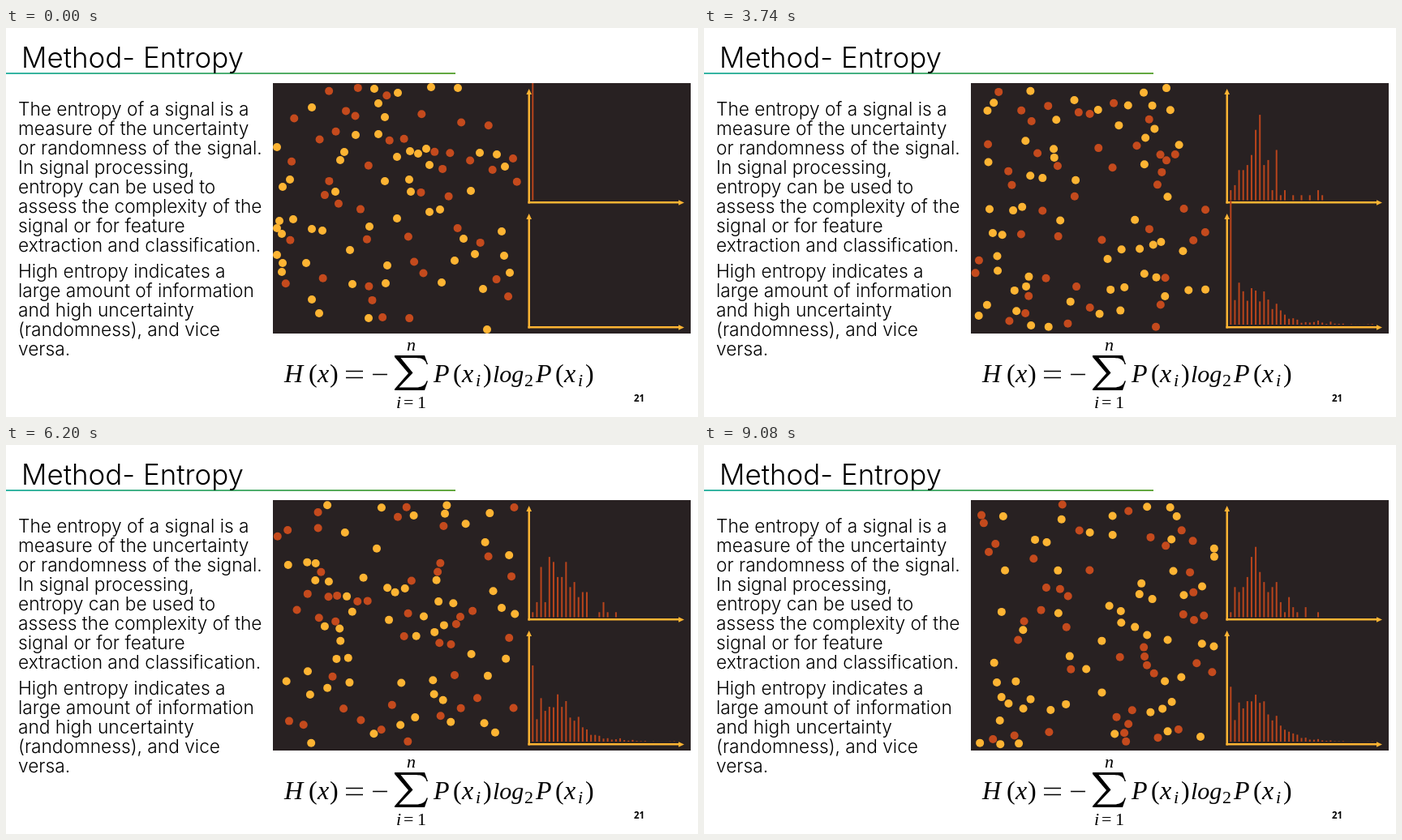
Recreate the animation shown at these times as an HTML page with a canvas. Size 853 px wide and 480 px high, loop 9.14 s.

```html
<!DOCTYPE html>
<html lang="en">
<head>
<meta charset="utf-8">
<title>Method- Entropy</title>
<style>
  html, body { margin: 0; width: 100%; height: 100%; overflow: hidden; background: #fff; }
  svg, canvas { position: absolute; left: 0; top: 0; }
  .slide { font-family: Inter, sans-serif; font-weight: 300; }
  .math { font: italic 32px "Liberation Serif", serif; }
  .up { font-style: normal; }
  .small { font-size: 22px; }
</style>
</head>
<body>
<canvas id="stage" width="853" height="480"></canvas>
<svg width="853" height="480">
  <linearGradient id="rule"><stop stop-color="#35b5a5"/><stop offset="1" stop-color="#64a83f"/></linearGradient>
  <rect y="55" width="554" height="2" fill="url(#rule)"/>
  <text class="slide" x="19" y="49" font-size="34.9">Method- Entropy</text>
  <g class="slide" id="body" font-size="22.7"></g>
  <g class="math">
    <text x="343" y="437">H<tspan class="up" x="373">(</tspan><tspan x="384">x</tspan><tspan class="up" x="399">)</tspan></text>
    <path d="M419 423.5h21m-21 8h21M452 427.5h18" stroke="#000" stroke-width="1.5"/>
    <path d="M479 404h37l4 11h-1.500q-2-8-13-8h-19l15 18.500-17 18h20q12 0 14-8h1.500l-4 11.500h-37v-1.500l17-19.500-17-20z"/>
    <text class="small" x="494" y="398">n</text>
    <text class="small" x="481" y="469">i<tspan class="up" x="490">=</tspan><tspan class="up" x="507">1</tspan></text>
    <text x="527" y="437">P<tspan class="up" x="551">(</tspan><tspan x="562">x</tspan><tspan class="up" x="588">)</tspan><tspan x="600" font-size="30">log</tspan><tspan x="653">P</tspan><tspan class="up" x="677">(</tspan><tspan x="688">x</tspan><tspan class="up" x="714">)</tspan></text>
    <text class="small" x="579" y="442">i<tspan class="up" x="639">2</tspan><tspan x="705">i</tspan></text>
  </g>
  <text x="774" y="461" font-family="Noto Sans, sans-serif" font-weight="700" font-size="11.500">21</text>
</svg>
<script>
const paragraphs = [
  [108, ["The entropy of a signal is a", "measure of the uncertainty", "or randomness of the signal.",
    "In signal processing,", "entropy can be used to", "assess the complexity of the",
    "signal or for feature", "extraction and classification."]],
  [308, ["High entropy indicates a", "large amount of information", "and high uncertainty",
    "(randomness), and vice", "versa."]]
];
document.getElementById("body").innerHTML = paragraphs.map(([top, lines]) =>
  lines.map((line, i) => `<text x="15" y="${top + i * 24}">${line}</text>`).join("")).join("");

const ORANGE = "#fdb433", RED = "#c44a1d", DARK = "#282122";
const PANEL = { x: 329, y: 68, w: 515, h: 309 };
const BOX = { left: 334, right: 631, top: 73, bottom: 372 };
const RADIUS = 5, COUNT = 100, FRAMES = 150, SUBSTEPS = 30;
const RMS_SPEED = 6.5, BIN_SPEED = 0.74, BINS = 36, UNIT = 6.2;
const FIRST_HOLD = 200, STEP = 60, LOOP = 9140;

const orangeStart = [
  454,75, 483,80, 524,73, 557,74, 377,98, 459,93, 467,110, 459,131, 431,132, 417,153,
  412,163, 334,147, 482,159, 498,152, 508,155, 518,149, 522,169, 584,154, 605,156, 615,171,
  467,189, 497,187, 499,202, 350,187, 341,196, 406,202, 573,201, 535,224, 522,227, 482,235,
  448,245, 337,238, 354,236, 334,247, 340,254, 377,248, 390,250, 334,280, 341,290, 340,301,
  370,290, 424,274, 427,316, 470,293, 468,315, 377,335, 386,352, 447,358, 564,260, 578,279,
  553,287, 537,314, 588,322, 611,251, 614,281, 621,302, 593,372
];

let seed = 21;
function random() {
  seed = (seed * 1664525 + 1013904223) % 4294967296;
  return seed / 4294967296;
}

function createBalls() {
  const balls = [];
  const add = (x, y, color, vx = 0, vy = 0) => balls.push({ x, y, vx, vy, color });
  for (let i = 0; i < orangeStart.length; i += 2) add(orangeStart[i], orangeStart[i + 1], ORANGE);
  // A single fast ball carries all the energy.
  add(625, 161, RED, -RMS_SPEED * Math.sqrt(COUNT) * 0.97, RMS_SPEED * Math.sqrt(COUNT) * 0.24);
  while (balls.length < COUNT) {
    const x = BOX.left + random() * (BOX.right - BOX.left);
    const y = BOX.top + random() * (BOX.bottom - BOX.top);
    if (balls.every(b => Math.hypot(b.x - x, b.y - y) > 11)) add(x, y, RED);
  }
  return balls;
}

function collide(a, b) {
  const dx = b.x - a.x, dy = b.y - a.y, d2 = dx * dx + dy * dy;
  if (d2 > 4 * RADIUS * RADIUS || d2 === 0) return;
  const push = ((b.vx - a.vx) * dx + (b.vy - a.vy) * dy) / d2;
  if (push >= 0) return;
  a.vx += push * dx; a.vy += push * dy;
  b.vx -= push * dx; b.vy -= push * dy;
}

function advance(balls) {
  for (let s = 0; s < SUBSTEPS; s++) {
    for (const b of balls) {
      b.x += b.vx / SUBSTEPS;
      b.y += b.vy / SUBSTEPS;
      if (b.x < BOX.left) { b.x = BOX.left; b.vx = Math.abs(b.vx); }
      if (b.x > BOX.right) { b.x = BOX.right; b.vx = -Math.abs(b.vx); }
      if (b.y < BOX.top) { b.y = BOX.top; b.vy = Math.abs(b.vy); }
      if (b.y > BOX.bottom) { b.y = BOX.bottom; b.vy = -Math.abs(b.vy); }
    }
    for (let i = 1; i < COUNT; i++) for (let j = 0; j < i; j++) collide(balls[i], balls[j]);
  }
}

function speedHistogram(balls) {
  const bins = new Array(BINS).fill(0);
  for (const b of balls) {
    const bin = Math.floor(Math.hypot(b.vx, b.vy) / BIN_SPEED);
    if (bin < BINS) bins[bin]++;
  }
  return bins;
}

function simulate() {
  const balls = createBalls(), total = new Array(BINS).fill(0), states = [];
  for (let k = 0; k < FRAMES; k++) {
    if (k) advance(balls);
    const now = speedHistogram(balls);
    if (k) now.forEach((n, i) => total[i] += n);
    states.push({
      balls: balls.map(({ x, y, color }) => ({ x, y, color })),
      now,
      mean: total.map(n => n / Math.max(k, 1))
    });
  }
  return states;
}

const ctx = document.getElementById("stage").getContext("2d");
ctx.beginPath();
ctx.rect(PANEL.x, PANEL.y, PANEL.w, PANEL.h);
ctx.clip();

function fillPath(color, points) {
  ctx.fillStyle = color;
  ctx.beginPath();
  points.forEach(([x, y]) => ctx.lineTo(x, y));
  ctx.fill();
}

function drawAxes(top, base) {
  ctx.fillStyle = ORANGE;
  ctx.fillRect(643.5, top + 5, 2.5, base - top - 4);
  ctx.fillRect(643.5, base - 1.5, 188, 2.5);
  fillPath(ORANGE, [[644.7, top], [648, top + 7], [641.4, top + 7]]);
  fillPath(ORANGE, [[836, base], [829, base - 3.3], [829, base + 3.3]]);
}

function drawBars(bins, base) {
  ctx.fillStyle = "#b8441c";
  bins.forEach((n, i) => ctx.fillRect(648.3 + i * 5.13, base - n * UNIT, 2, n * UNIT));
}

function draw({ balls, now, mean }) {
  ctx.fillStyle = DARK;
  ctx.fillRect(PANEL.x, PANEL.y, PANEL.w, PANEL.h);
  for (const { x, y, color } of balls) {
    ctx.fillStyle = color;
    ctx.beginPath();
    ctx.arc(x, y, RADIUS, 0, Math.PI * 2);
    ctx.fill();
  }
  drawAxes(75, 215.5);
  drawAxes(229, 369.5);
  drawBars(now, 212.5);
  drawBars(mean, 366);
}

const states = simulate();
const start = performance.now();
function tick() {
  const t = (performance.now() - start) % LOOP;
  const k = t < FIRST_HOLD ? 0 : 1 + Math.floor((t - FIRST_HOLD) / STEP);
  draw(states[Math.min(k, FRAMES - 1)]);
  requestAnimationFrame(tick);
}
tick();
</script>
</body>
</html>
```
